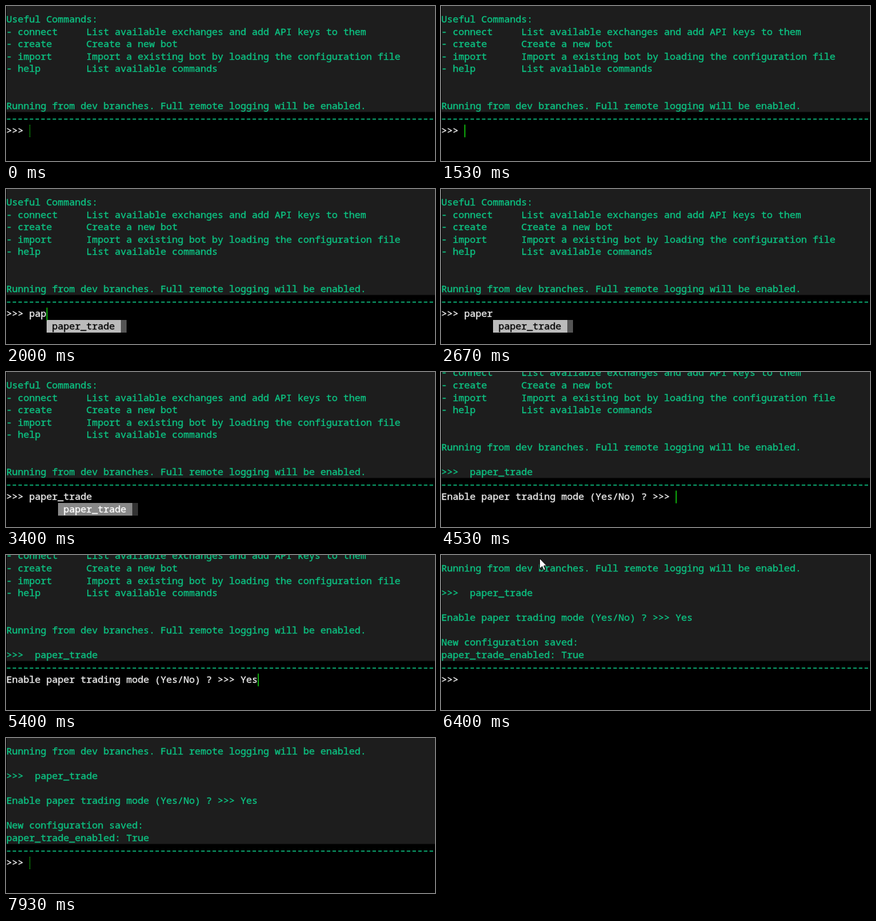
An HTML page with a canvas for the animation above (8070 ms loop, 676 by 245 pixels).

```html
<!DOCTYPE html>
<html lang="en">
<head>
<meta charset="utf-8">
<title>Terminal session</title>
<style>
  html, body { margin: 0; width: 100%; height: 100%; overflow: hidden; background: #000; }
  canvas { display: block; }
</style>
</head>
<body>
<canvas id="stage" width="676" height="245"></canvas>
<script>
const ctx = document.getElementById('stage').getContext('2d');
const LOOP = 8070, COL = 9, ROW = 19.55, BASE = 26, INSET = .6;
const GREEN = '#0cc584', WHITE = '#f0f0f0', CARET = '#13d40f';

const LOG = [
  'Useful Commands:',
  '- connect     List available exchanges and add API keys to them',
  '- create      Create a new bot',
  '- import      Import a existing bot by loading the configuration file',
  '- help        List available commands',
  '', '',
  'Running from dev branches. Full remote logging will be enabled.',
  '',
  '>>>  paper_trade',
  '',
  'Enable paper trading mode (Yes/No) ? >>> Yes',
  '',
  'New configuration saved:',
  'paper_trade_enabled: True'
];
const ASK = 'Enable paper trading mode (Yes/No) ? >>> ';

// Each scene: start, first log line, prompt, typed text as [time, text]
const SCENES = [
  { at: 0, top: 0, prompt: '>>> ', keys: [[0, ''], [1800, 'p'], [1900, 'pa'], [2000, 'pap'],
    [2130, 'pape'], [2200, 'paper'], [2930, 'paper_trade']] },
  { at: 3470, top: 2, prompt: ASK, keys: [[3470, ''], [5000, 'Y'], [5200, 'Ye'], [5400, 'Yes']] },
  { at: 5670, top: 7, prompt: '>>> ', keys: [[5670, '']] }
];
const CARET_STATES = [[0, 'dots'], [70, 'on'], [1000, 'off'], [1530, 'on'], [2670, 'off'],
  [2930, 'on'], [3400, 'off'], [3470, 'on'], [4000, 'off'], [4530, 'on'], [6130, 'off'],
  [6670, 'on'], [7200, 'off'], [7730, 'on'], [7930, 'dots']];
const POINTER = [[0, null], [6330, [109, 1]], [6400, [155, 5]], [6470, [187, 1]], [6530, null]];

const latest = (list, t) => list.filter(e => e[0] <= t).pop()[1];

// A hairline stroke gives the glyphs their slightly heavy weight
function text(str, col, row, color) {
  const x = col * COL + INSET, y = Math.round(BASE + row * ROW);
  ctx.fillStyle = ctx.strokeStyle = color;
  ctx.lineWidth = .35;
  ctx.fillText(str, x, y);
  ctx.strokeText(str, x, y);
}

function box(x, y, w, h, color) {
  ctx.fillStyle = color;
  ctx.fillRect(x, y, w, h);
}

function rule() {
  for (let x = 0; x < 676; x += COL) box(x + 1.5, 178, 5.5, 1.5, GREEN);
}

function menu(col, label, width, chosen) {
  box(col * COL + 1, 207, width * COL, 20, chosen ? '#888' : '#bbb');
  box((col + width) * COL + 1, 207, COL, 20, chosen ? '#333' : '#555');
  text(label, col + 1, 10, chosen ? '#fff' : '#000');
}

function caret(col, state) {
  if (state === 'off') return;
  const x = col * COL + .8;
  if (state === 'on') return box(x, 187.5, 1.5, 20, CARET);
  for (let y = 188; y < 208; y += 2) box(x, y, 1.5, 1, CARET);
}

function pointer([x, y]) {
  ctx.beginPath();
  [[0, 0], [0, 16], [4, 12.5], [6.5, 18.5], [9, 17.5], [6.5, 11.5], [11, 11.5]]
    .forEach(([dx, dy]) => ctx.lineTo(x + dx + .5, y + dy + .5));
  ctx.closePath();
  ctx.fillStyle = '#fff';
  ctx.fill();
  ctx.strokeStyle = '#111';
  ctx.lineWidth = 1;
  ctx.stroke();
}

function draw(t) {
  const scene = SCENES.filter(s => s.at <= t).pop();
  const typed = latest(scene.keys, t);
  const start = scene.prompt.length, col = start + typed.length;

  box(0, 0, 676, 245, '#000');
  box(1, 0, 675, 167.5, '#1d1d1d');
  ctx.font = '15px "Noto Sans Mono", monospace';
  for (let r = -1; r < 8; r++) text(LOG[scene.top + r] || '', 0, r, GREEN);
  rule();
  text(scene.prompt + typed, 0, 9, WHITE);

  if (typed === 'paper_trade') menu(start + 5, typed, 13, true);
  else if (typed[0] === 'p') menu(col, 'paper_trade', 13, false);
  else if (typed && typed !== 'Yes') menu(col, 'Yes', 7, false);

  caret(col, latest(CARET_STATES, t));
  const spot = latest(POINTER, t);
  if (spot) pointer(spot);
}

const origin = performance.now();
function tick() {
  draw((performance.now() - origin) % LOOP);
  requestAnimationFrame(tick);
}
tick();
</script>
</body>
</html>
```
